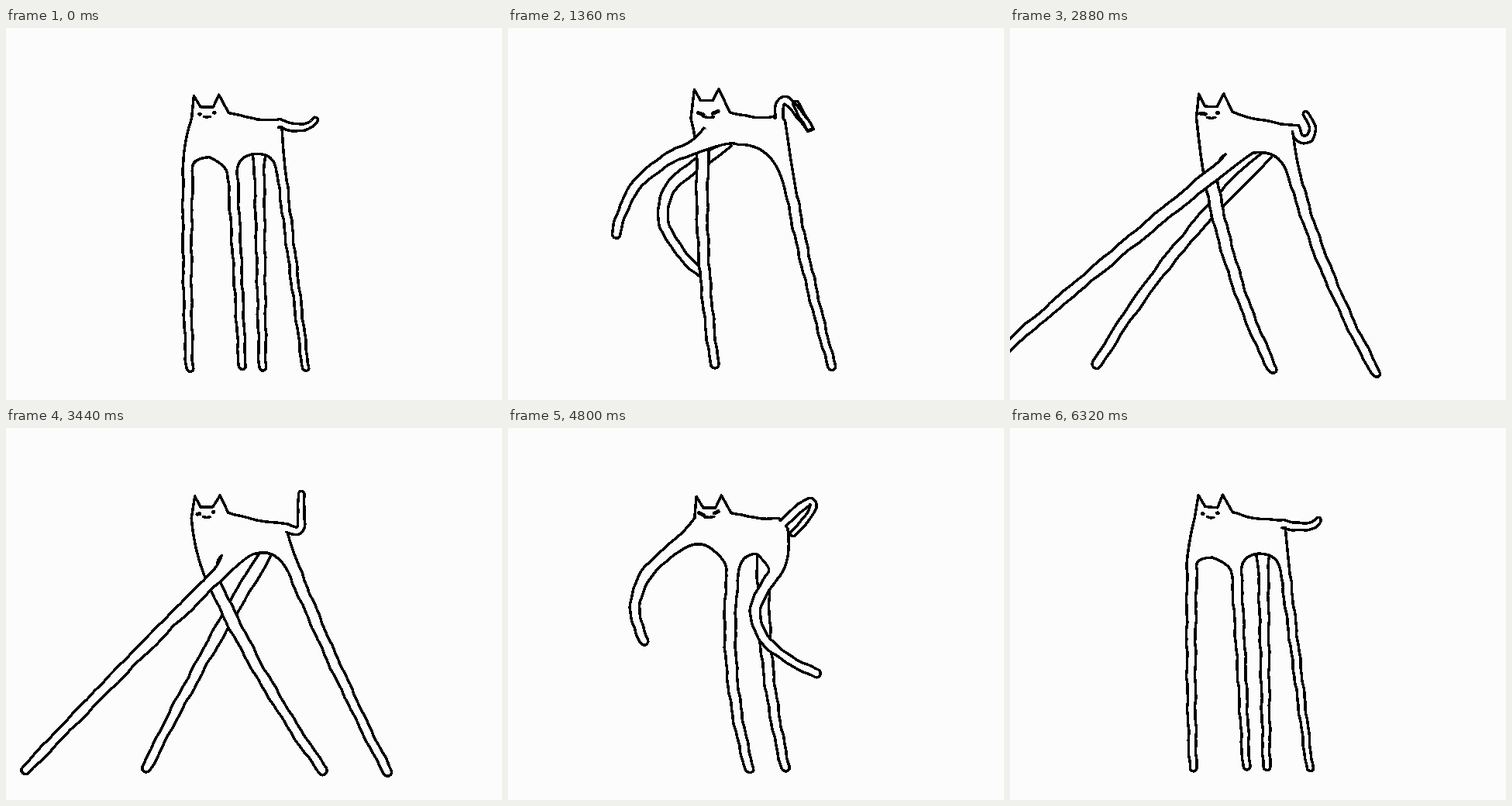
These frames come from a looping animation (640 by 480 pixels, 6.4 s). An HTML page:

```html
<!DOCTYPE html>
<html lang="en">
<head>
<meta charset="utf-8">
<title>Long-legged cat</title>
<style>
  html, body { margin: 0; width: 100%; height: 100%; overflow: hidden; background: #fcfcfc; }
  svg { display: block; width: 100%; height: 100%; }
  path { fill: none; stroke: #000; stroke-width: 3.5; stroke-linecap: round; stroke-linejoin: round; shape-rendering: crispEdges; }
  .limb { fill: #fcfcfc; }
  #eyes { stroke-width: 5; }
</style>
</head>
<body>
<svg viewBox="0 0 640 480">
  <path id="farHind" class="limb"/>
  <path id="farFront" class="limb"/>
  <path id="nearHind" class="limb"/>
  <path id="tail" class="limb"/>
  <path id="body"/>
  <path id="nearFront" class="limb"/>
  <path id="eyes"/>
  <path id="mouth"/>
</svg>
<script>
const STEP = 80, COUNT = 80;
const el = id => document.getElementById(id);

// Keys are [step, ...values]; the result is a smooth, non-overshooting curve per value.
function track(...keys) {
  keys.push([COUNT, ...keys[0].slice(1)]);
  const rate = (i, j) => (keys[i + 1][j] - keys[i][j]) / (keys[i + 1][0] - keys[i][0]);
  const slope = (i, j) => {
    if (i === 0 || i === keys.length - 1) return 0;
    const p = rate(i - 1, j), q = rate(i, j);
    return p * q <= 0 ? 0 : 2 * p * q / (p + q);
  };
  return s => {
    let i = 0;
    while (i < keys.length - 2 && keys[i + 1][0] <= s) i++;
    const k = keys[i], n = keys[i + 1], d = n[0] - k[0], t = (s - k[0]) / d;
    const h = t * t * (3 - 2 * t), u = 1 - t;
    return k.slice(1).map((v, m) => v + (n[m + 1] - v) * h
      + d * t * u * (slope(i, m + 1) * u - slope(i + 1, m + 1) * t));
  };
}

// Legs that hang from the chest and rump: hip, bend, foot.
const farFront = track(
  [0, 235, 178, 232, 313, 237, 443],
  [17, 251, 180, 247, 290, 267, 439],
  [25, 257, 180, 258, 310, 296, 441],
  [36, 261, 205, 285, 331, 341, 445],
  [49, 279, 207, 352, 317, 453, 447],
  [53, 258, 190, 300, 290, 260, 385],
  [56, 215, 155, 130, 175, 59, 206],
  [60, 215, 154, 140, 207, 178, 280],
  [63, 226, 190, 205, 300, 191, 420],
  [70, 232, 185, 222, 315, 211, 443]);
const nearHind = track(
  [0, 355, 185, 369, 296, 387, 443],
  [17, 366, 215, 386, 322, 419, 441],
  [25, 362, 190, 389, 319, 453, 444],
  [36, 367, 190, 399, 312, 475, 450],
  [45, 377, 190, 432, 308, 504, 449],
  [49, 384, 189, 462, 308, 560, 448],
  [51, 392, 184, 510, 280, 612, 358],
  [54, 361, 193, 385, 275, 450, 300],
  [60, 342, 191, 277, 265, 403, 319],
  [68, 354, 187, 362, 305, 391, 442]);

// Legs that hang from the belly: bend, foot.
const nearFront = track(
  [0, 299, 309, 305, 441],
  [9, 220, 240, 171, 325],
  [13, 140, 160, 62, 182],
  [17, 152, 189, 139, 271],
  [25, 212, 165, 184, 213],
  [27, 105, 275, -25, 350],
  [36, 125, 299, -30, 434],
  [45, 162, 312, 47, 446],
  [49, 208, 318, 141, 447],
  [60, 277, 317, 313, 445]);
const farHind = track(
  [0, 329, 310, 331, 442],
  [9, 300, 310, 248, 375],
  [17, 154, 235, 254, 320],
  [25, 276, 192, 228, 210],
  [27, 207, 290, 118, 378],
  [36, 194, 298, 109, 439],
  [49, 300, 315, 265, 445],
  [60, 328, 313, 359, 443]);
const coilUp = track([0, 0], [17, 0], [25, 14], [28, 0]);

// Roots on the belly: near front leg on both sides, far hind leg.
const belly = track(
  [0, 262, 167, 320, 162, 318, 163],
  [9, 264, 142, 305, 157, 312, 160],
  [17, 252, 130, 297, 151, 272, 152],
  [25, 256, 126, 290, 151, 305, 155],
  [28, 277, 160, 300, 159, 318, 161],
  [49, 279, 165, 325, 162, 327, 163],
  [60, 265, 159, 320, 162, 321, 163]);

// Left ear tip, end of the back, rump.
const trunk = track(
  [0, 243, 87, 350, 119, 356, 128],
  [17, 240, 79, 343, 115, 358, 119],
  [25, 244, 77, 337, 117, 361, 120],
  [36, 244, 86, 372, 126, 366, 138],
  [49, 243, 88, 355, 121, 360, 132],
  [60, 244, 88, 349, 117, 361, 130]);

// Two bends and the tip.
const tail = track(
  [0, 370, 128, 392, 133, 400, 116],
  [9, 372, 115, 382, 98, 394, 79],
  [17, 345, 35, 425, 200, 370, 94],
  [25, 350, 25, 366, 25, 366, 121],
  [36, 376, 158, 404, 140, 379, 109],
  [49, 395, 118, 360, 90, 381, 64],
  [60, 390, 82, 415, 88, 366, 138],
  [67, 395, 112, 370, 90, 387, 65]);

// Mouth half width, eye half length, slant, wink.
const face = track([0, 4, 0, 0, 0], [17, 7, 3, 1.5, 0], [25, 4, 0, 0, 0],
  [36, 5, 0, 0, 3], [49, 4, 0, 0, 0], [60, 6, 2.5, 1.5, 0]);

let seed = 0;
// Hand-drawn unevenness: one field for the whole drawing keeps joints closed.
function pt([x, y]) {
  const dx = .6 * Math.sin(y * .13 + seed) + .35 * Math.sin(y * .31 + x * .07 + seed * 2.3);
  const dy = .6 * Math.sin(x * .14 + seed * 1.7) + .3 * Math.sin(x * .33 - y * .05 + seed);
  return (x + dx).toFixed(1) + ' ' + (y + dy).toFixed(1);
}

const pairs = v => v.flatMap((x, i) => i % 2 ? [] : [[x, v[i + 1]]]);
const mix = (a, b, t) => a.map((x, i) => x + (b[i] - x) * t);
const line = (...p) => 'M' + p.map(pt).join('L');

function bezier(p, n) {
  return Array.from({ length: n + 1 }, (_, i) => {
    let q = p;
    while (q.length > 1) q = q.slice(1).map((b, k) => mix(q[k], b, i / n));
    return q[0];
  });
}

function dirs(p) {
  return p.map((_, i) => {
    const a = p[Math.max(i - 1, 0)], b = p[Math.min(i + 1, p.length - 1)];
    const x = b[0] - a[0], y = b[1] - a[1], l = Math.hypot(x, y) || 1;
    return [x / l, y / l];
  });
}

// Outline of a limb from root a to root b; bendA and bendB round the root corners.
function limb(a, b, c, w, bendA, bendB, coil = 0) {
  const n = c.length - 1, l = Math.hypot(c[n][0] - c[n - 1][0], c[n][1] - c[n - 1][1]) || 1;
  const tip = mix(c[n], c[n - 1], w * .35 / l), top = 48;
  let mid = bezier([...c.slice(0, n), tip], top), d = dirs(mid);
  if (coil > .1) {
    mid = mid.map(([x, y], i) => {
      const u = i / top, o = coil * Math.sin(u * Math.PI * 6) * Math.sqrt(Math.sin(Math.PI * u) + 1e-9);
      return [x - d[i][1] * o, y + d[i][0] * o];
    });
    d = dirs(mid);
  }
  const side = s => mid.map(([x, y], i) => {
    const h = s * w / 2 * (1 - .3 * i / top);
    return [x - d[i][1] * h, y + d[i][0] * h];
  });
  const left = side(1), right = side(-1), [dx, dy] = d[top], r = w * .35;
  const cap = [1, 2, 3, 4, 5].map(k => {
    const s = r * Math.sin(k * Math.PI / 6), q = r * Math.cos(k * Math.PI / 6);
    return [mid[top][0] + dx * s - dy * q, mid[top][1] + dy * s + dx * q];
  });
  const corner = (p, e, bend) => {
    const t = bend * Math.max(0, (e[0] - p[0]) * d[0][0] + (e[1] - p[1]) * d[0][1]);
    return pt([e[0] - d[0][0] * t, e[1] - d[0][1] * t]);
  };
  return 'M' + pt(a) + 'Q' + corner(a, left[0], bendA) + ' '
    + [...left, ...cap, ...right.reverse()].map(pt).join('L')
    + 'Q' + corner(b, right[top], bendB) + ' ' + pt(b);
}

// A leg reaching sideways leaves the belly further from its root.
function hang(a, b, v, coil) {
  const [bend, foot] = pairs(v), root = mix(a, b, .5);
  const x = bend[0] - root[0], l = Math.hypot(x, bend[1] - root[1]) || 1;
  const reach = 22 + 30 * Math.abs(x) / l * (1 - coil / 14);
  return [mix(root, bend, reach / l), bend, foot];
}

function draw(step) {
  seed = step * 2.399 % (Math.PI * 20);
  const show = (id, d) => el(id).setAttribute('d', d);
  const [chest, groin, far] = pairs(belly(step));
  const [ear, back, rump] = pairs(trunk(step));
  const w = 12.5 + 4 * Math.sin(Math.PI * step / COUNT);
  const [coil] = coilUp(step), thin = w - coil / 5;
  const at = (x, y) => [ear[0] + x, ear[1] + y];
  const cheek = [ear[0] - 4, 116], far2 = [far[0] + 17, far[1]];

  show('farHind', limb(far, far2, hang(far, far2, farHind(step), coil), thin, .5, .5, coil * .8));
  show('farFront', limb(cheek, chest, pairs(farFront(step)), w, .5, .9));
  show('nearHind', limb(groin, rump, pairs(nearHind(step)), w - 1, .9, .5));
  show('tail', limb(rump, back, [mix(back, rump, .5), ...pairs(tail(step))], 10.5, .6, .6));
  show('nearFront', limb(chest, groin, hang(chest, groin, nearFront(step), coil), thin, .5, .9, coil));

  const nape = [287, 109], mid = mix(nape, back, .45);
  mid[1] += 5;
  show('body', line(cheek, ear, at(8, 15), at(24, 15), at(32, -1), ...bezier([nape, mid, back], 8)));

  const [mw, len, slant, wink] = face(step);
  const l = len + wink + .2, r = len + .2;
  show('eyes', line([249 - l, 111 - slant], [249 + l, 111 + slant])
    + line([268 - r, 109 + slant], [268 + r, 109 - slant]));
  show('mouth', line([259 - mw, 115], [259, 116], [259 + mw, 115]));
}

let shown = -1;
function tick(now) {
  const step = Math.floor(now / STEP) % COUNT;
  if (step !== shown) draw(shown = step);
  requestAnimationFrame(tick);
}
draw(0);
requestAnimationFrame(tick);
</script>
</body>
</html>
```
